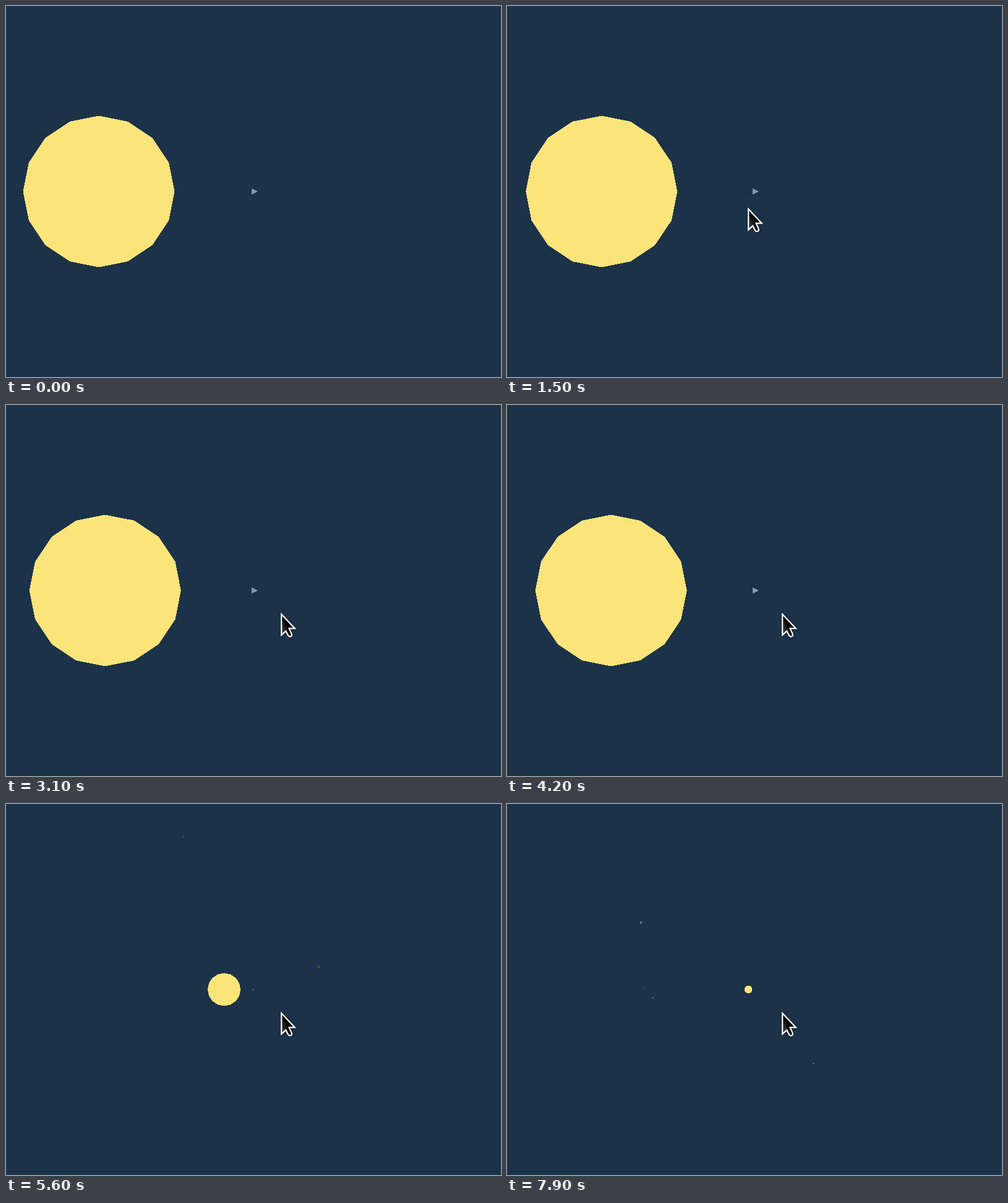
An HTML page with a canvas that plays this animation: 800 px wide and 600 px high, repeating every 8 s.

```html
<!DOCTYPE html>
<html lang="en">
<head>
<meta charset="utf-8">
<title>Space zoom</title>
<style>
html, body { margin: 0; width: 100%; height: 100%; overflow: hidden; background: #1c3248; }
canvas { display: block; }
</style>
</head>
<body>
<canvas id="stage" width="800" height="600"></canvas>
<script>
const ctx = document.getElementById('stage').getContext('2d');
const LOOP = 8000, STEP = 100;
const CX = 400, CY = 300;

// Wheel clicks reached at each step from 4.4 s on; each click zooms out by 1.1
const ZOOM_START = 44;
const CLICKS = [2, 4, 5, 5, 5, 6, 7, 9, 10, 12, 13, 15, 16, 18, 19, 20, 22, 24, 25, 27, 28, 29, 30, 31];

// Position around the sun at 7.9 s, radius, colour
const BODIES = [
  [708, -143, 7.5, '#79592f'],
  [-282, -1142, 5, '#75633f'],
  [-455, 1756, 9, '#62707a'],
  [2021, 2303, 26, '#7d4f72'],
  [-3334, -2073, 38, '#60778a'],
  [-3248, -67, 18, '#60778a'],
  [-2969, 259, 25, '#60778a']
];

function zoomAt(t) {
  const i = Math.round(t * 10) - ZOOM_START;
  if (i < 0) return 1;
  return Math.pow(1.1, -CLICKS[Math.min(i, CLICKS.length - 1)]);
}

// Fills a convex polygon with hard pixel edges
function fillPoly(pts, color) {
  const ys = pts.map(p => p[1]);
  const top = Math.max(0, Math.floor(Math.min(...ys)));
  const bottom = Math.min(599, Math.ceil(Math.max(...ys)));
  ctx.fillStyle = color;
  for (let y = top; y <= bottom; y++) {
    const row = y + 0.5;
    let left = Infinity, right = -Infinity;
    pts.forEach((a, i) => {
      const b = pts[(i + 1) % pts.length];
      if ((a[1] <= row) === (b[1] <= row)) return;
      const x = a[0] + (row - a[1]) / (b[1] - a[1]) * (b[0] - a[0]);
      left = Math.min(left, x);
      right = Math.max(right, x);
    });
    const from = Math.ceil(left - 0.5), to = Math.floor(right - 0.5);
    if (to >= from) ctx.fillRect(from, y, to - from + 1, 1);
  }
}

function disc(x, y, r, color) {
  const pts = [];
  for (let i = 0; i < 16; i++) {
    const a = i * Math.PI / 8;
    pts.push([x + r * Math.cos(a), y + r * Math.sin(a)]);
  }
  fillPoly(pts, color);
}

function drawBody([bx, by, r, color], t, sunX, s) {
  const dist = Math.hypot(bx, by);
  const speed = 0.0157 * Math.pow(722 / dist, 1.5);
  const a = Math.atan2(by, bx) + speed * (t - 7.9);
  const x = sunX + dist * Math.cos(a) * s;
  const y = CY + dist * Math.sin(a) * s;
  const size = r * s;
  ctx.globalAlpha = Math.min(1, Math.max(0.4, size * 0.9));
  if (size < 0.8) {
    ctx.fillStyle = color;
    ctx.fillRect(Math.floor(x), Math.floor(y), 1, 1);
  } else {
    disc(x, y, size, color);
  }
  ctx.globalAlpha = 1;
}

function drawShip(s) {
  const pts = [[-3.3, -5], [6.7, 0], [-3.3, 5]];
  fillPoly(pts.map(([x, y]) => [CX + x * s, CY + y * s]), '#8399b1');
}

function drawCursor(t) {
  if (t < 0.9) return;
  const left = 1 - Math.min(1, (t - 0.9) / 0.9);
  const x = 445 - 439 * Math.pow(left, 1.893);
  const y = 337 - 194 * Math.pow(left, 2.73);
  ctx.save();
  ctx.translate(Math.round(x), Math.round(y));
  ctx.beginPath();
  ctx.moveTo(0.2, 1.6);
  ctx.lineTo(0.2, 35);
  ctx.lineTo(7.2, 28.4);
  ctx.lineTo(11, 35.8);
  ctx.quadraticCurveTo(12.6, 38.4, 15.2, 37.2);
  ctx.quadraticCurveTo(17.6, 36, 16.5, 33.4);
  ctx.lineTo(12.4, 24.3);
  ctx.lineTo(21.6, 24.3);
  ctx.closePath();
  const g = ctx.createLinearGradient(0, 22, 9, 18);
  g.addColorStop(0, '#383838');
  g.addColorStop(1, '#000');
  ctx.lineWidth = 2;
  ctx.strokeStyle = '#fff';
  ctx.shadowColor = 'rgba(0,0,0,0.4)';
  ctx.shadowBlur = 3;
  ctx.shadowOffsetX = 1;
  ctx.shadowOffsetY = 1;
  ctx.stroke();
  ctx.shadowColor = 'transparent';
  ctx.fillStyle = g;
  ctx.fill();
  ctx.stroke();
  ctx.restore();
}

function draw(ms) {
  const t = Math.floor((ms % LOOP) / STEP) * STEP / 1000;
  const s = zoomAt(t);
  const sunX = CX - (250 - 0.435 * t - 0.93 * t * t) * s;
  ctx.fillStyle = '#1c3248';
  ctx.fillRect(0, 0, 800, 600);
  disc(sunX, CY, 122.5 * s, '#fbe47a');
  BODIES.forEach(b => drawBody(b, t, sunX, s));
  drawShip(s);
  drawCursor(t);
}

const start = performance.now();
function tick() {
  draw(performance.now() - start);
  requestAnimationFrame(tick);
}
tick();
</script>
</body>
</html>
```
